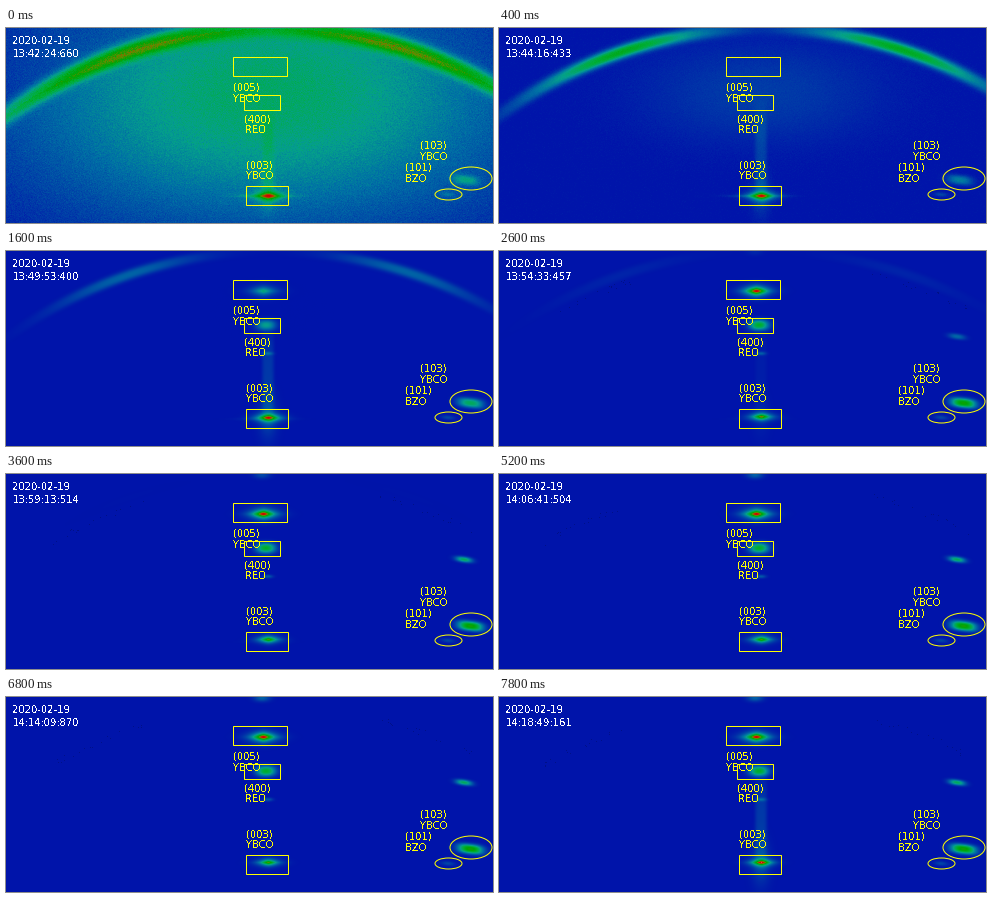
These frames come from a looping animation (487 px wide and 195 px high, 8 s). A matplotlib script:

```python
import numpy as np
import matplotlib.pyplot as plt
from matplotlib.animation import FuncAnimation
from matplotlib.colors import LinearSegmentedColormap
from matplotlib.patches import Ellipse, Rectangle

W, H, DPI = 487, 195, 100
FRAMES, STEP = 40, 200
YELLOW = "#ffff00"
PX = 72 / DPI
plt.rcParams["text.antialiased"] = False

X, Y = np.meshgrid(np.arange(W) + 0.5, np.arange(H) + 0.5)

# Detector colour scale: blue, teal, green, olive, red
SCALE = LinearSegmentedColormap.from_list("detector", [
    (0, "#0014aa"), (0.3, "#0070a5"), (0.45, "#05a08c"), (0.6, "#00af3c"),
    (0.72, "#00a505"), (0.82, "#648c00"), (0.89, "#be3200"),
    (0.98, "#cd0000"), (1, "#ffebdc")], N=512)

# Debye ring
CX, TOP, R = 266, 0.5, 451
RADIUS = np.hypot(X - CX, Y - TOP - R)


def ramp(i, start, length):
    k = min(max((i - start) / length, 0), 1)
    return k * k * (3 - 2 * k)


def decay(i, rate):
    return np.exp(-rate * i)


def add(base, layer):
    return base + layer * (1 - np.clip(base, 0, 0.9))


def bump(x, y, a, b, power=2.0, tilt=0.0):
    u = X - x
    v = Y - y - tilt * u
    return np.exp(-np.abs(u / a) ** power - np.abs(v / b) ** power)


def haze(i):
    k = decay(i, 1.5)
    glow = 0.52 * decay(i, 0.7) * bump(262, 65, 110 + 150 * k, 45 + 90 * k, 2.2)
    return np.where(RADIUS > R, 0.65, 1) * glow


def ring(i):
    strength = 0.7 * np.exp(-(i / 8) ** 2)
    spread = 70 + 100 * decay(i, 0.7)
    thick = 5 + 4.5 * decay(i, 0.5)
    along = np.exp(-((np.abs(X - 262) - 140) / spread) ** 2)
    across = np.exp(-np.abs((RADIUS - R) / thick) ** 2.5)
    return strength * along * across


def beam(i):
    """Strength of the specular streak: dies away, then returns."""
    return 1 - ramp(i, 7, 9) + ramp(i, 34, 5)


def streak(i):
    column = bump(262, 125, 6, 42, 4) * 0.12 + bump(262, 166, 9, 22) * 0.15
    wing = 0.2 * decay(i, 0.15) * bump(258, 168, 28, 1.3)
    return beam(i) * column + wing


def peaks(i):
    late = ramp(i, 0, 16)
    yield 0.8 + 0.19 * beam(i), bump(262.5, 168 - 2.5 * late, 12 - 2 * late,
                                     4.2 - 0.8 * late, 1.5)
    yield ramp(i, 3, 10), bump(257.5, 40, 12, 4.6, 1.5)
    yield 0.63 * ramp(i, 1, 11), bump(260, 74, 10, 5.3, 2.3)
    yield 0.22 * ramp(i, 2, 6), bump(262, 102.5, 5, 1.8)
    yield (0.34 + 0.4 * ramp(i, 2, 12),
           bump(460 + 4.5 * ramp(i, 0, 8), 152, 13, 4.8, 2.6, 0.11))
    yield 0.54 * ramp(i, 9, 8), bump(458, 85.5, 8.5, 2.8, 2.3, 0.13)
    yield 0.16, bump(442, 166.5, 7, 2.2, tilt=0.08)
    yield 0.25 * ramp(i, 8, 16), bump(256, 1, 8, 3.5)


def speckle(rgb, rng):
    """Sparse dark pixels left along the inner edge of the ring."""
    for lo, hi in ((45, 138), (372, 470)):
        x = rng.integers(lo, hi, 18)
        r = R - rng.uniform(6, 12, x.size)
        y = (TOP + R - np.sqrt(r ** 2 - (x - CX) ** 2)).astype(int)
        rgb[y, x] *= 0.8


def picture(i):
    rng = np.random.default_rng(100 + i)
    field = add(add(haze(i), ring(i)), streak(i))
    field += 0.022 * decay(i, 0.5) * rng.standard_normal((H, W))
    for level, shape in peaks(i):
        field = add(field, level * shape)
    rgb = SCALE(np.clip(field, 0, 0.985))[..., :3]
    if i >= 12:
        speckle(rgb, rng)
    return rgb


def clock(i):
    start = 13 * 3600 + 42 * 60 + 24.660
    passed = np.interp(i, [0, 2, 8, 18, 26, 34, 39],
                       [0, 111.773, 448.740, 1008.854, 1456.844, 1905.210,
                        2184.501])
    s, ms = divmod(round((start + passed) * 1000), 1000)
    return f"{s // 3600}:{s // 60 % 60:02d}:{s % 60:02d}:{ms:03d}"


fig = plt.figure(figsize=(W / DPI, H / DPI), dpi=DPI)
ax = fig.add_axes([0, 0, 1, 1])
ax.axis("off")
image = ax.imshow(picture(0), extent=(0, W, H, 0), aspect="auto",
                  interpolation="nearest")
ax.set_xlim(0, W)
ax.set_ylim(H, 0)


def label(x, y, text, color=YELLOW):
    return ax.text(x, y, text, color=color, family="DejaVu Sans",
                   fontsize=10 * PX, ha="left", va="baseline")


def outline(patch):
    patch.set(fill=False, edgecolor=YELLOW, linewidth=PX)
    ax.add_patch(patch)


for x, y, w, h in ((227, 29, 54, 19), (238, 67, 36, 15), (240, 158, 42, 19)):
    outline(Rectangle((x - 0.5, y - 0.5), w, h))
outline(Ellipse((465, 150.5), 42, 23))
outline(Ellipse((442.5, 166.5), 27, 11))

for x, y, plane, phase in ((228, 63, "(005)", "YBCO"),
                           (239, 94, "(400)", "REO"),
                           (241, 140, "(003)", "YBCO"),
                           (415, 121, "(103)", "YBCO"),
                           (400, 143, "(101)", "BZO")):
    label(x - 0.5, y, plane)
    label(x - 0.5, y + 11, phase)

label(6.5, 16, "2020-02-19", "white")
stamp = label(6.5, 29, clock(0), "white")


def draw(i):
    image.set_data(picture(i))
    stamp.set_text(clock(i))
    return image, stamp


anim = FuncAnimation(fig, draw, frames=FRAMES, interval=STEP, repeat=True,
                     repeat_delay=0, blit=False)
plt.show()
```
